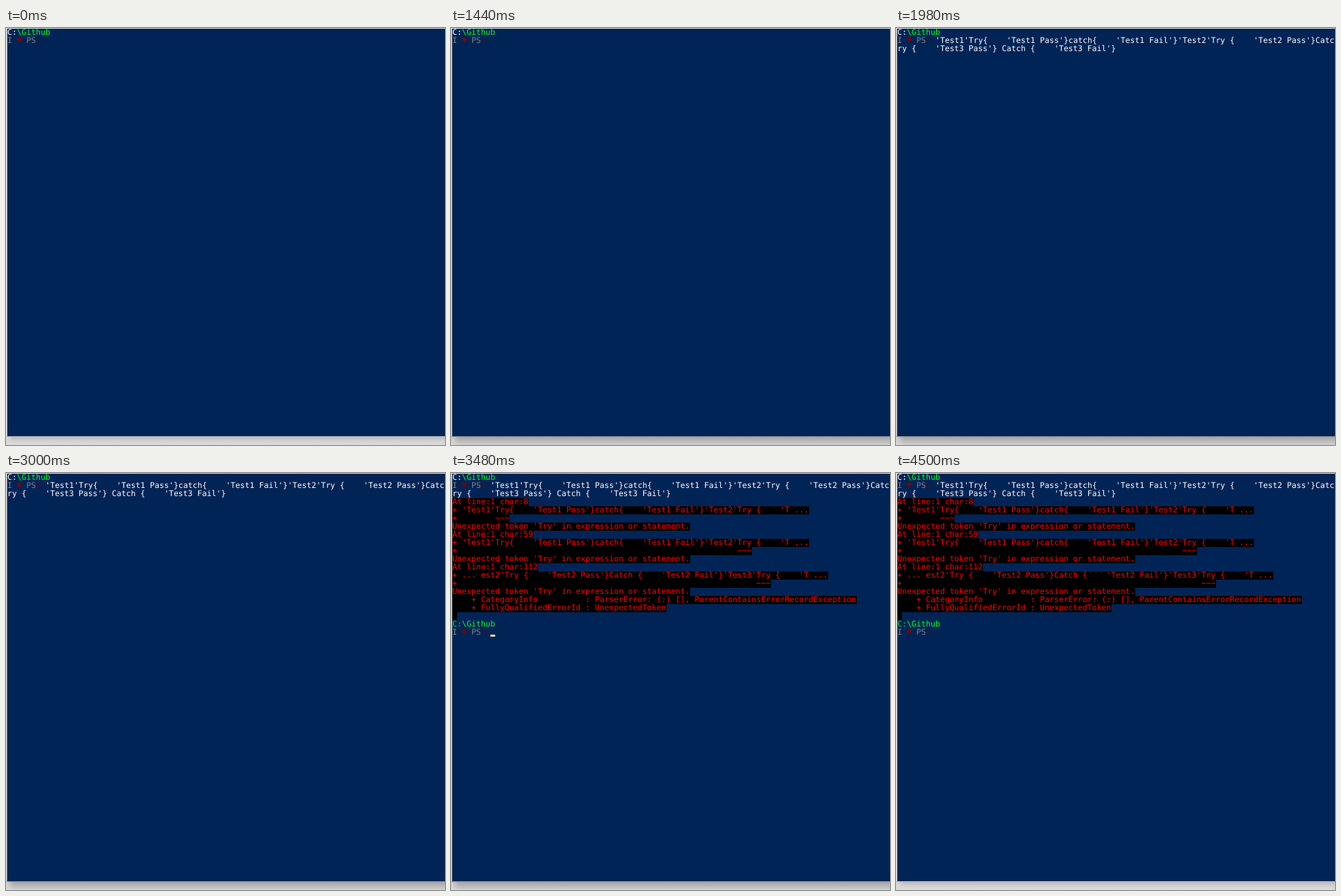
Animation of 646 by 614 pixels, one loop 4.56 s. Source, as an HTML page:

```html
<!DOCTYPE html>
<html lang="en">
<head>
<meta charset="utf-8">
<title>Console</title>
<style>
html, body { margin: 0; width: 100%; height: 100%; overflow: hidden; background: #dcdcdc; }
svg { display: block; }
text {
  font-family: "DejaVu Sans Mono", monospace;
  font-size: 11.628px; /* 7px advance */
  white-space: pre;
  text-rendering: geometricPrecision;
}
</style>
</head>
<body>
<svg id="stage" width="646" height="614" viewBox="0 0 646 614">
  <defs>
    <linearGradient id="idle" x1="0" y1="0" x2="0" y2="1">
      <stop offset="0" stop-color="#b4b4b4"/>
      <stop offset=".5" stop-color="#d0d0d0"/>
      <stop offset="1" stop-color="#dcdcdc"/>
    </linearGradient>
    <linearGradient id="active" x1="0" y1="0" x2="0" y2="1">
      <stop offset="0" stop-color="#a0a0a0"/>
      <stop offset="1" stop-color="#d0d0d0"/>
    </linearGradient>
    <linearGradient id="corner">
      <stop offset="0" stop-color="#dcdcdc" stop-opacity=".8"/>
      <stop offset="1" stop-color="#dcdcdc" stop-opacity="0"/>
    </linearGradient>
  </defs>
  <rect width="646" height="614" fill="#e4e4e4"/>
  <rect id="shadow" y="601" width="646" height="13"/>
  <rect y="602" width="12" height="12" fill="url(#corner)"/>
  <rect id="edge" x="1" y="1" width="645" height="601"/>
  <rect x="2" y="1" width="644" height="600" fill="#012456"/>
</svg>
<script>
const LOOP = 4560, CELL = 7, ROW = 12;
const stage = document.getElementById("stage");
const shadow = document.getElementById("shadow");
const edge = document.getElementById("edge");

function add(parent, tag, attrs) {
  const el = document.createElementNS("http://www.w3.org/2000/svg", tag);
  for (const key in attrs) el.setAttribute(key, attrs[key]);
  return parent.appendChild(el);
}

const cellX = col => 2 + col * CELL;
const cellY = row => 1 + row * ROW;
const group = () => add(stage, "g", {});

function write(parent, col, row, str, fill) {
  add(parent, "text", { x: cellX(col), y: cellY(row) + 9, fill }).textContent = str;
}

function writeError(parent, row, str) {
  add(parent, "rect", {
    x: cellX(0), y: cellY(row), width: str.length * CELL, height: ROW, fill: "#000"
  });
  write(parent, 0, row, str, "#f00");
}

function prompt(parent, row, drive) {
  write(parent, 0, row, "C:", drive);
  write(parent, 2, row, "\\Github", "#00ff1c");
  write(parent, 0, row + 1, "I", "#808080");
  write(parent, 2, row + 1, "♥", "#800000");
  write(parent, 4, row + 1, "PS", "#808080");
  write(parent, 6, row + 1, ">", "#640016");
}

prompt(group(), 0, "#fff");

const gap = "    ";
const pasted = group();
write(pasted, 8, 1, `'Test1'Try{${gap}'Test1 Pass'}catch{${gap}'Test1 Fail'}'Test2'Try {${gap}'Test2 Pass'}Catc`, "#fff");
write(pasted, 0, 2, `ry {${gap}'Test3 Pass'} Catch {${gap}'Test3 Fail'}`, "#fff");

const firstError = group();
writeError(firstError, 3, "At line:1 char:8");

const result = group();
const excerpt = `+ 'Test1'Try{${gap}'Test1 Pass'}catch{${gap}'Test1 Fail'}'Test2'Try {${gap}'T ...`;
const excerpt3 = `+ ... est2'Try {${gap}'Test2 Pass'}Catch {${gap}'Test2 Fail'}'Test3'Try {${gap}'T ...`;
const mark = col => "+".padEnd(col) + "~~~";
const unexpected = "Unexpected token 'Try' in expression or statement.";
[
  excerpt, mark(9), unexpected,
  "At line:1 char:59", excerpt, mark(60), unexpected,
  "At line:1 char:112", excerpt3, mark(64), unexpected,
  "    + CategoryInfo          : ParserError: (:) [], ParentContainsErrorRecordException",
  "    + FullyQualifiedErrorId : UnexpectedToken",
  " "
].forEach((line, i) => writeError(result, 4 + i, line));
prompt(result, 18, "#00d81c");

const cursor = add(stage, "rect", { width: CELL, height: 3, fill: "#fedba9" });

// Cursor visibility: start, end, column, row
const blinks = [
  [960, 1440, 8, 1],
  [1500, 1980, 46, 2],
  [2520, 3000, 46, 2],
  [3420, 3480, 16, 3],
  [3480, 4020, 8, 19]
];

const show = (el, on) => el.setAttribute("visibility", on ? "visible" : "hidden");

function draw(t) {
  const focused = t >= 480 && t < 4500;
  shadow.setAttribute("fill", focused ? "url(#active)" : "url(#idle)");
  edge.setAttribute("fill", focused ? "#8c8c8c" : "#b8bcc2");
  show(pasted, t >= 1500);
  show(firstError, t >= 3420);
  show(result, t >= 3480);
  const blink = blinks.find(([from, to]) => t >= from && t < to);
  show(cursor, blink);
  if (blink) {
    cursor.setAttribute("x", cellX(blink[2]));
    cursor.setAttribute("y", cellY(blink[3]) + 9);
  }
}

const start = performance.now();
function tick() {
  draw((performance.now() - start) % LOOP);
  requestAnimationFrame(tick);
}
tick();
</script>
</body>
</html>
```
